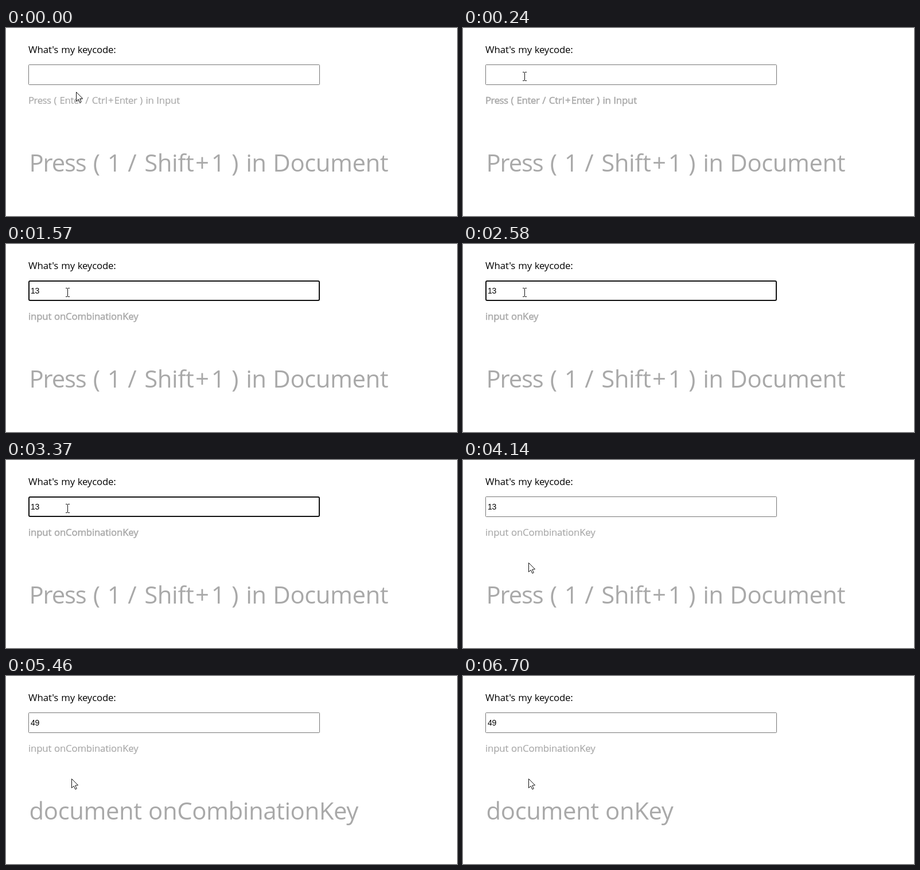
Recreate the animation shown at these times as an HTML page with a canvas. Size 786 px wide and 330 px high, loop 7.32 s.

```html
<!DOCTYPE html>
<html lang="en">
<head>
<meta charset="utf-8">
<title>Keycode demo</title>
<style>
  html, body { margin: 0; width: 100%; height: 100%; overflow: hidden; background: #fff; }
  canvas { display: block; width: 786px; height: 330px; }
</style>
</head>
<body>
<canvas id="stage"></canvas>
<script>
const W = 786, H = 330, LOOP = 7320;
const LEFT = 39, GREY = '#a9a9a9';
const canvas = document.getElementById('stage');
const ctx = canvas.getContext('2d');
const dpr = window.devicePixelRatio || 1;
canvas.width = W * dpr;
canvas.height = H * dpr;

// Lines of words: [word, start in em, tracking in em]
const LINES = {
  title: [["What's", 0, -.004], ['my', 3.274], ['keycode:', 4.893]],
  inputTip: [['Press', 0, -.027], ['(', 2.553], ['Enter', 3.129, -.022], ['/', 5.685],
    ['Ctrl', 6.349], ['+', 7.965], ['Enter', 8.581, -.022], [')', 11.137],
    ['in', 11.713], ['Input', 12.795]],
  inputCombo: [['input', 0], ['onCombinationKey', 2.575]],
  inputKey: [['input', 0], ['onKey', 2.575]],
  docTip: [['Press', 0, -.027], ['(', 2.553], ['1', 3.129], ['/', 3.942],
    ['Shift', 4.606], ['+', 6.645], ['1', 7.281], [')', 8.094],
    ['in', 8.67], ['Document', 9.752]],
  docCombo: [['document', 0], ['onCombinationKey', 4.765]],
  docKey: [['document', 0], ['onKey', 4.765]]
};

// Each track lists [time, state]; the last state reached holds.
const TRACKS = {
  cursor: [[0, ['arrow', 122, 112]], [80, ['arrow', 117, 103]], [160, ['beam', 110, 91]],
    [240, ['beam', 107, 85]], [3830, ['arrow', 108, 107]], [3910, ['arrow', 110, 135]],
    [3990, ['arrow', 112, 162]], [4060, ['arrow', 114, 180]]],
  focus: [[0, false], [320, true], [4140, false]],
  caret: [[0, false], [320, true], [480, false], [560, true], [1570, false], [2110, true],
    [2580, false], [2660, true], [3370, false], [3910, true], [4140, false]],
  value: [[0, ''], [790, '17'], [1030, '13'], [2660, '17'], [2900, '13'],
    [4760, '49'], [5380, '16'], [5460, '49']],
  hint: [[0, 'inputTip'], [1030, 'inputCombo'], [1960, 'inputKey'], [2900, 'inputCombo']],
  doc: [[0, 'docTip'], [4760, 'docKey'], [5460, 'docCombo'], [6700, 'docKey']]
};

function at(track, t) {
  let state;
  for (const [time, value] of track) if (t >= time) state = value;
  return state;
}

function drawLine(name, left, y, em, color, weight = 0) {
  ctx.font = `${em * .96}px "Open Sans", "Noto Sans", sans-serif`;
  ctx.fillStyle = ctx.strokeStyle = color;
  ctx.lineWidth = weight;
  for (const [word, x, track = -.009] of LINES[name]) {
    ctx.letterSpacing = `${track * em}px`;
    ctx.fillText(word, left + x * em, y);
    if (weight) ctx.strokeText(word, left + x * em, y);
  }
  ctx.letterSpacing = '0px';
}

function drawInput(value, focus, caret) {
  const edge = focus ? 2 : 1;
  ctx.strokeStyle = focus ? '#101010' : '#767676';
  ctx.lineWidth = edge;
  ctx.beginPath();
  ctx.roundRect(LEFT + edge / 2, 64 + edge / 2, 508 - edge, 36 - edge, edge);
  ctx.stroke();
  ctx.font = '14px "Liberation Sans", Arial, sans-serif';
  ctx.letterSpacing = '-0.4px';
  ctx.fillStyle = '#000';
  ctx.fillText(value, 43, 87);
  if (caret) ctx.fillRect(43 + Math.floor(ctx.measureText(value).width), 75, 1, 15);
  ctx.letterSpacing = '0px';
}

function drawArrow(x, y) {
  const tip = [[0, 0], [0, 16], [3.7, 12.6], [6.3, 18.4], [8.7, 17.3], [6.2, 11.6], [11, 11.2]];
  ctx.beginPath();
  for (const [dx, dy] of tip) ctx.lineTo(x + .5 + dx, y + .5 + dy);
  ctx.closePath();
  ctx.fillStyle = '#fff';
  ctx.strokeStyle = '#111';
  ctx.lineWidth = 1;
  ctx.fill();
  ctx.stroke();
}

function drawBeam(x, y) {
  ctx.fillStyle = '#111';
  ctx.fillRect(x, y - 7, 1, 14);
  for (const top of [y - 8, y + 7]) {
    ctx.fillRect(x - 3, top, 3, 1);
    ctx.fillRect(x + 1, top, 3, 1);
  }
}

function draw(t) {
  const now = {};
  for (const key in TRACKS) now[key] = at(TRACKS[key], t);
  const [shape, x, y] = now.cursor;
  ctx.setTransform(dpr, 0, 0, dpr, 0, 0);
  ctx.fillStyle = '#fff';
  ctx.fillRect(0, 0, W, H);
  drawLine('title', LEFT, 44, 17.5, '#000');
  drawInput(now.value, now.focus, now.caret);
  // The hint is a touch heavier while the input is hovered.
  drawLine(now.hint, LEFT, 133, 17.45, GREY, shape === 'beam' ? .5 : .2);
  drawLine(now.doc, LEFT + 1.6, 252, 43.55, GREY);
  (shape === 'beam' ? drawBeam : drawArrow)(x, y);
}

const start = performance.now();
function tick() {
  draw((performance.now() - start) % LOOP);
  requestAnimationFrame(tick);
}
tick();
</script>
</body>
</html>
```
